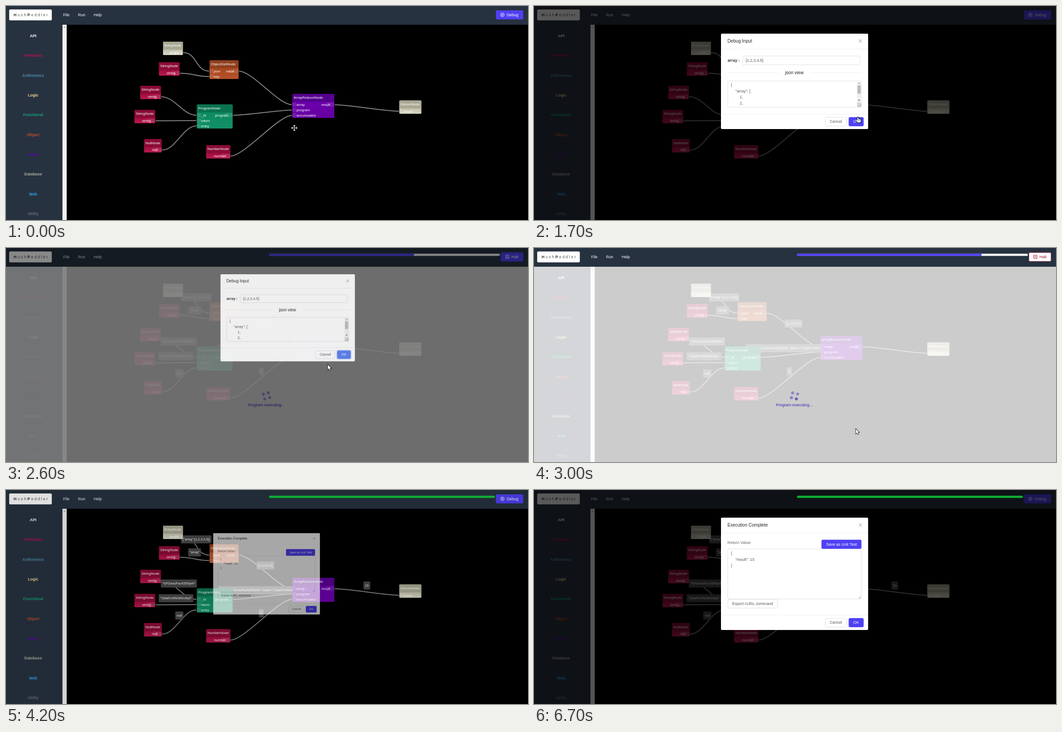
An HTML page with a canvas that plays this animation: 1167x480 px, repeating every 6800 ms.

```html
<!DOCTYPE html>
<html lang="en">
<head>
<meta charset="utf-8">
<title>Node editor</title>
<style>
html, body { margin: 0; width: 100%; height: 100%; overflow: hidden; background: #000; }
canvas { display: block; }
</style>
</head>
<body>
<canvas id="stage" width="1167" height="480"></canvas>
<script>
const W = 1167, H = 480, LOOP = 6800, STEP = 100;
const FONT = '"Liberation Sans", Arial, sans-serif';
const PRIMARY = [79, 64, 245], HOVER = [89, 126, 247], WHITE = [255, 255, 255], DANGER = [168, 16, 58];
const main = document.getElementById('stage').getContext('2d');
let g = main;

// timing
const OPEN = 1063.4, CLOSE = 2544, RUN = 2600, SPIN = 2505, DONE = 4200, OPEN2 = 4163;

const clamp = v => Math.max(0, Math.min(1, v));
const mix = (a, b, p) => a + (b - a) * p;
const rgb = c => `rgb(${c.map(Math.round)})`;
const blend = (a, b, p) => rgb(a.map((v, i) => mix(v, b[i], p)));
const smooth = p => p * p * (3 - 2 * p);

function bezier(x1, y1, x2, y2) {
  const f = (a, b, u) => 3 * (1 - u) * (1 - u) * u * a + 3 * (1 - u) * u * u * b + u * u * u;
  return x => {
    let lo = 0, hi = 1;
    for (let i = 0; i < 24; i++) {
      const m = (lo + hi) / 2;
      if (f(x1, x2, m) < x) lo = m; else hi = m;
    }
    return f(y1, y2, (lo + hi) / 2);
  };
}
const outCirc = bezier(.08, .82, .17, 1);
const inOutCirc = bezier(.78, .14, .15, .86);
const outQuint = bezier(.23, 1, .32, 1);

function box(x, y, w, h, r, fill, stroke) {
  g.beginPath();
  g.roundRect(x, y, w, h, r);
  if (fill) { g.fillStyle = fill; g.fill(); }
  if (stroke) { g.strokeStyle = stroke; g.lineWidth = .8; g.stroke(); }
}

// y is the vertical middle of the line
function text(s, x, y, color, size = 8.86, align = 'left', weight = 'normal') {
  g.font = `${weight} ${size}px ${FONT}`;
  g.textAlign = align;
  g.fillStyle = color;
  g.fillText(s, x, y + size * .35);
}

function path(points, color, width, close) {
  g.beginPath();
  points.forEach(([x, y]) => g.lineTo(x, y));
  if (close) g.closePath();
  g.strokeStyle = color;
  g.lineWidth = width;
  g.stroke();
}

function shape(points, color) {
  g.beginPath();
  points.forEach(([x, y]) => g.lineTo(x, y));
  g.fillStyle = color;
  g.fill();
}

function cross(x, y, r, color, width) {
  path([[x - r, y - r], [x + r, y + r]], color, width);
  path([[x + r, y - r], [x - r, y + r]], color, width);
}

// graph
const CURVE = 30;
const RED = ['#8b0b37', '#a20d3f', '#b91a4e'], SAND = ['#a9a893', '#c3c1ac', '#d9d7c6'];
const node = (title, x, y, w, colors, ins, out) =>
  ({ title, x, y, w, colors, ins, out, h: 18 + 12 * Math.max(ins.length, 1) });
const nodes = {
  entry: node('EntryNode', 351, 80, 44.5, SAND, [], 'props'),
  key: node('StringNode', 341.8, 126.2, 46.3, RED, [], 'string'),
  id: node('StringNode', 300, 179, 46.3, RED, [], 'string'),
  token: node('StringNode', 287.1, 232.9, 46.3, RED, [], 'string'),
  nil: node('NullNode', 308.7, 298.6, 39.5, RED, [], 'null'),
  number: node('NumberNode', 447.5, 312, 54, RED, [], 'number'),
  get: node('ObjectGetNode', 455, 121.8, 65, ['#90401d', '#a8471f', '#b5532b'], ['json', 'key'], 'value'),
  program: node('ProgramNode', 426.7, 220.8, 80, ['#0a7350', '#0d8a60', '#129068'], ['_id', 'token', 'entry'], 'program'),
  reduce: node('ArrayReduceNode', 640, 197.1, 94, ['#56008f', '#6a00ab', '#6600a2'], ['array', 'program', 'accumulator'], 'result'),
  result: node('ReturnNode', 879.3, 211.8, 49.3, SAND, ['result'], '')
};
const ID = '"GF3vviuPoc435FjwH"', TOKEN = '"fJdafCmRkS6trx6q4"';
const edges = [
  ['entry', 'get', 0, '{"array":[1,2,3,4,5]}'],
  ['key', 'get', 1, '"array"'],
  ['id', 'program', 0, ID],
  ['token', 'program', 1, TOKEN],
  ['nil', 'program', 2, 'null'],
  ['get', 'reduce', 0, '[1,2,3,4,5]'],
  ['program', 'reduce', 1, `{"_id":${ID},"token":${TOKEN}}`],
  ['number', 'reduce', 2, '0'],
  ['reduce', 'result', 0, '15']
];
const rowY = (n, i) => n.y + 24 + 12 * i;

function drawNode({ title, x, y, w, h, colors, ins, out }) {
  const fill = g.createLinearGradient(0, y + 18, 0, y + h);
  fill.addColorStop(0, colors[1]);
  fill.addColorStop(1, colors[2]);
  box(x, y, w, h, 2, fill);
  box(x, y, w, 18, [2, 2, 0, 0], colors[0]);
  text(title, x + 3, y + 8.4, '#fff', 8);
  const port = 'rgba(255,255,255,.1)';
  ins.forEach((s, i) => {
    box(x, rowY({ y }, i) - 4.5, 9, 9, 1, port);
    text(s, x + 9.5, rowY({ y }, i), '#fff', 8);
  });
  if (out) {
    box(x + w - 18, y + 19.5, 18, 9, 1, port);
    text(out, x + w - 9.5, y + 24, '#fff', 8, 'right');
  }
}

function drawGraph(t) {
  const ends = edges.map(([a, b, i, label]) => {
    const n = nodes[a], m = nodes[b];
    return { x1: n.x + n.w + 1, y1: n.y + 24.5, x2: m.x - 1, y2: rowY(m, i) + .3, label };
  });
  for (const { x1, y1, x2, y2 } of ends) {
    g.beginPath();
    g.moveTo(x1, y1);
    g.bezierCurveTo(x1 + CURVE, y1, x2 - CURVE, y2, x2, y2);
    g.strokeStyle = '#858585';
    g.lineWidth = 2;
    g.stroke();
  }
  if (t >= RUN) for (const { x1, y1, x2, y2, label } of ends) {
    if (label === '15' && t < DONE) continue;
    const x = (x1 + x2) / 2, y = (y1 + y2) / 2 - 14.5;
    g.font = `7.3px ${FONT}`;
    const w = g.measureText(label).width + 7;
    box(x - w / 2, y - 9, w, 18, 2, '#464646');
    text(label, x, y, '#fff', 7.3, 'center');
  }
  Object.values(nodes).forEach(drawNode);
}

// chrome
const menu = [
  ['API', '#fff'], ['Primitives', '#b5124a'], ['Arithmetics', '#4c8ba8'], ['Logic', '#f3d596'],
  ['Functional', '#16a371'], ['Object', '#c04f28'], ['Array', '#5c00ae'], ['Database', '#acaca0'],
  ['Web', '#2ea3e6'], ['Utility', '#6b6b6b']
];

function drawSidebar() {
  box(0, 42, 126.2, H, 0, '#273240');
  menu.forEach(([s, c], i) => text(s, 60.7, 66.8 + 44.35 * i, c, 8.86, 'center', 'bold'));
  box(126.2, 42, 9.5, H, 0, '#f1f1f1');
  shape([[128.8, 48.2], [131, 45.8], [133.2, 48.2]], '#8a8a8a');
}

function drawLogo() {
  box(7.1, 7.7, 95.3, 24.6, 2.5, '#fff');
  let x = 17;
  for (const c of 'HushPeddler') {
    const big = c < 'a';
    text(c, x, 20, big ? '#333' : '#555', 8.86, 'left', big ? 'bold' : 'normal');
    x += g.measureText(c).width + 2.53;
  }
}

function drawButton(t) {
  if (t >= RUN && t < DONE) {
    const p = clamp((t - RUN) / 300), ink = blend(WHITE, DANGER, p);
    box(1106.4, 10.2, 49.5, 19.7, 2.5, blend(PRIMARY, WHITE, p), blend(PRIMARY, DANGER, p));
    g.strokeStyle = ink;
    g.lineWidth = 1;
    g.strokeRect(1117.2, 16.2, 7.2, 7.2);
    cross(1120.8, 19.8, 1.6, ink, 1);
    text('Halt', 1130, 19.8, ink);
    return;
  }
  const hover = clamp((t - 800) / 200) * (1 - clamp((t - 1100) / 300));
  box(1095.3, 9.7, 60.9, 20.3, 2.5, blend(PRIMARY, HOVER, hover));
  g.beginPath();
  g.arc(1109.8, 19.8, 4, 0, 7);
  g.strokeStyle = '#fff';
  g.lineWidth = 1;
  g.stroke();
  path([[1108.6, 17.8], [1111.8, 19.8], [1108.6, 21.8]], '#fff', .8, true);
  text('Debug', 1119.4, 19.8, '#fff');
}

function drawProgress(t) {
  if (t < RUN || t >= DONE) return;
  const run = t - SPIN - 15, w = 516 * .8 * outCirc(clamp(run / 400));
  box(588, 12.7, 516, 5, 2.5, '#f5f5f5');
  box(588, 12.7, w, 5, 2.5, rgb(PRIMARY));
  const p = outQuint(clamp((run - 480) / 1920));
  if (p > 0) box(588, 12.7, w * p, 5, 2.5, `rgba(255,255,255,${.5 * (1 - p)})`);
}

function drawHeader(t) {
  box(0, 0, W, 42, 0, '#273240');
  drawLogo();
  text('File', 127.7, 19.8, '#fff');
  text('Run', 161, 19.8, '#fff');
  text('Help', 196, 19.8, '#fff');
  drawProgress(t);
  drawButton(t);
}

function drawSpinner(t) {
  const run = t - SPIN;
  for (let k = 0; k < 4; k++) {
    const a = (270 + run * .3 + 90 * k) * Math.PI / 180;
    const beat = Math.max(0, run / 1000 - .4 * k) % 2;
    g.globalAlpha = .45 + .55 * (beat > 1 ? 2 - beat : beat);
    g.beginPath();
    g.arc(582.4 + 8 * Math.cos(a), 331.7 + 8 * Math.sin(a), 3.3, 0, 7);
    g.fillStyle = '#4330bd';
    g.fill();
  }
  g.globalAlpha = 1;
  text('Program executing...', 582, 352, '#3f25b4', 8.86, 'center');
}

// dialogs
const INK = '#595959', LINE = '#d9d9d9', RULE = '#e8e8e8';

function button(s, x, y, w, fill) {
  box(x + .4, y + .2, w - .8, 19.6, 2.5, fill || '#fff', fill || LINE);
  text(s, x + w / 2, y + 9.8, fill ? '#fff' : INK, 8.86, 'center');
}

function drawFrame(title, h, okColor) {
  box(418, 62, 329, h, 2.5, '#fff');
  box(418, 96, 329, .7, 0, RULE);
  box(418, 62 + h - 34, 329, .7, 0, RULE);
  text(title, 432.5, 78.5, '#262626', 10.1);
  cross(729.5, 78.5, 3.4, '#777', .9);
  button('Cancel', 651, 35.5 + h, 47.5);
  button('OK', 703.5, 35.5 + h, 33.5, okColor);
}

const lines = (list, y) => list.forEach((s, i) => {
  const body = s.trimStart();
  text(body, 440.3 + (s.length - body.length) * 2.46, y + 13.4 * i, INK);
});

function grip(x, y) {
  path([[x - 5.5, y], [x, y - 5.5]], '#777', .7);
  path([[x - 2.5, y], [x, y - 2.5]], '#777', .7);
}

function drawInput(t) {
  const hover = clamp((t - 1700) / 300);
  if (t >= 2500) box(701.5, 247.5, 37.5, 24, 3.5, 'rgba(89,126,247,.3)');
  drawFrame('Debug Input', 214, blend(PRIMARY, HOVER, hover));
  if (t >= 2500) box(702.6, 248.6, 35.3, 21.8, 3, null, 'rgba(89,126,247,.5)');
  text('array :', 432.7, 121.5, '#333', 8.86, 'left', 'bold');
  box(466.4, 112.2, 262.3, 19.6, 2.5, '#fff', LINE);
  text('[1,2,3,4,5]', 473.3, 121.8, INK);
  box(433, 149.3, 114, .7, 0, RULE);
  box(618, 149.3, 114, .7, 0, RULE);
  text('json view', 582, 149, '#262626', 10.1, 'center');
  box(433.3, 168, 298.5, 59, 2.5, '#fff', LINE);
  lines(['{', '    "array": [', '        1,', '        2,'], 177.2);
  box(722, 168.5, 9.3, 58, 0, '#f1f1f1');
  shape([[724.5, 174.3], [726.7, 171.8], [728.9, 174.3]], '#888');
  box(723, 178, 7.4, 18.5, 0, '#bdbdbd');
  shape([[724.5, 210.6], [726.7, 213.1], [728.9, 210.6]], '#444');
  box(722, 217, 9.3, 9.5, 0, '#d6d6d6');
  grip(731, 226);
}

function drawResult() {
  drawFrame('Execution Complete', 252, rgb(PRIMARY));
  text('Return Value:', 432.6, 118, '#666');
  box(433.3, 132.3, 298.5, 112, 2.5, '#fff', LINE);
  button('Save as Unit Test', 642.6, 111.7, 89.5, rgb(PRIMARY));
  lines(['{', '    "result": 15', '}'], 142);
  grip(731, 243.5);
  button('Export cURL command', 433, 245, 111.5);
}

const layer = document.createElement('canvas');
layer.width = W;
layer.height = H;
const layerCtx = layer.getContext('2d');

// Flattened first, so that the dialog fades as one piece.
function drawDialog(draw, e, ox, oy) {
  if (e <= 0) return;
  g = layerCtx;
  g.clearRect(0, 0, W, H);
  draw();
  g = main;
  const s = .2 + .8 * e;
  g.save();
  g.globalAlpha = e;
  g.translate(ox * (1 - s), oy * (1 - s));
  g.scale(s, s);
  g.drawImage(layer, 0, 0);
  g.restore();
}

function drawMask(p) {
  box(0, 0, W, H, 0, `rgba(0,0,0,${.65 * p})`);
}

// pointer
function arrow(x, y) {
  const p = [[0, 0], [0, 10.4], [2.5, 8.2], [4.2, 12], [6, 11.2], [4.3, 7.5], [7.4, 7.3]];
  const at = p.map(([a, b]) => [x + a, y + b]);
  path(at, '#000', 1.6, true);
  shape(at, '#fff');
}

function hand(x, y) {
  const part = (grow, color) => {
    box(x - 1 - grow, y - grow, 2 + 2 * grow, 8 + 2 * grow, 1.2, color);
    box(x - 1 - grow, y + 4 - grow, 7.4 + 2 * grow, 8 + 2 * grow, 2, color);
    path([[x - 3.3, y + 6.2], [x, y + 10.5]], color, 2 + 2 * grow);
  };
  part(.9, '#000');
  part(0, '#fff');
  for (const d of [1.4, 3.4]) path([[x + d, y + 4.5], [x + d, y + 8]], '#000', .6);
}

function mover(x, y) {
  for (let k = 0; k < 4; k++) {
    g.save();
    g.translate(x, y);
    g.rotate(k * Math.PI / 2);
    path([[0, 0], [0, -6]], '#fff', 1);
    path([[-2.3, -3.8], [0, -6.2], [2.3, -3.8]], '#fff', 1.1);
    g.restore();
  }
}

function drawPointer(t) {
  if (t < 1200) {
    const p = smooth(clamp((t - 200) / 700));
    const x = mix(644.5, 1123.5, p), y = mix(273.5, 26, p);
    if (y > 42) mover(x, y);
    else if (t >= 900 && t < 1100) hand(x, y);
    else arrow(x, y);
  } else if (t < 2500) {
    const p = smooth(clamp((t - 1200) / 500));
    (t < 1700 ? arrow : hand)(mix(1123.5, 724, p), mix(26, 249.5, p));
  } else if (t < 3200) {
    const p = clamp((t - RUN) / 500);
    arrow(719.5, 262 + 225 * p * p);
  }
}

function draw(t) {
  box(0, 0, W, H, 0, '#000');
  drawGraph(t);
  drawSidebar();
  if (t >= RUN && t < DONE) {
    box(0, 42, W, H, 0, 'rgba(255,255,255,.8)');
    drawSpinner(t);
  }
  drawHeader(t);
  if (t < RUN + 300) {
    const leave = clamp((t - CLOSE) / 200);
    drawMask(clamp((t - OPEN) / 200) * (1 - leave));
    const e = outCirc(clamp((t - OPEN) / 300)) * (1 - inOutCirc(leave));
    if (t > OPEN) drawDialog(() => drawInput(t), e, 1126.6, 25.3);
  } else if (t >= DONE) {
    drawMask(clamp((t - OPEN2) / 200));
    box(588, 12.7, 505, 5, 2.5, '#0fae34');
    drawDialog(drawResult, outCirc(clamp((t - OPEN2) / 300)), 582.5, 188);
  }
  drawPointer(t);
}

const start = performance.now();
function tick() {
  const t = (performance.now() - start) % LOOP;
  draw(Math.floor(t / STEP) * STEP);
  requestAnimationFrame(tick);
}
tick();
</script>
</body>
</html>
```
